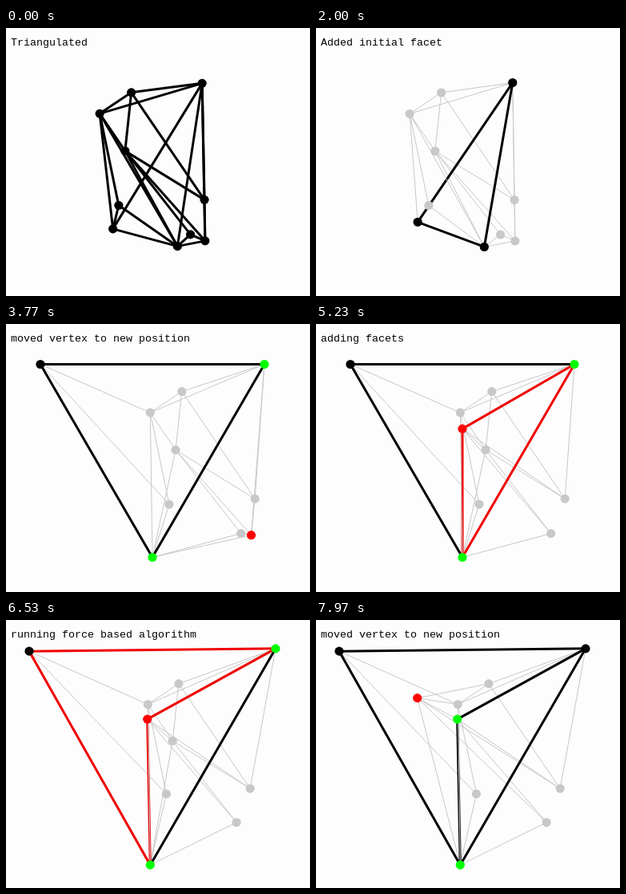
These frames come from a looping animation (380 by 336 pixels, 8 s). An HTML page with a canvas:

```html
<!DOCTYPE html>
<html lang="en">
<head>
<meta charset="utf-8">
<title>Planar drawing, step by step</title>
<style>
html, body { margin: 0; width: 100%; height: 100%; overflow: hidden; background: #fdfdfe; }
canvas { display: block; }
</style>
</head>
<body>
<canvas id="stage" width="380" height="336"></canvas>
<script>
const ctx = document.getElementById('stage').getContext('2d');
const LOOP = 8000;
const CENTER = [183, 171.5];

const START = {
  A: [117.3, 107.5], B: [156.8, 81], C: [245.3, 69.5], D: [149, 154.3], E: [141, 222.5],
  F: [133.8, 252], G: [214.5, 273.8], H: [230.7, 259], I: [249, 267], J: [248.2, 215.5]
};
const NAMES = Object.keys(START);
const EDGES = ('AB AC AF AE AD BC BD BJ EF EG CJ CI DJ DI DH DG ' +
  'GH IJ HI CF CG FG GI AG').split(' ').filter(e => e !== 'HI');

const BLACK = [0, 0, 0], RED = [255, 0, 0], LINE_RED = [240, 0, 0], GREEN = [0, 255, 0];
const FAINT = [200, 200, 200];
const STRONG_WIDTH = 3, FAINT_WIDTH = 1;

// Each stage fades to its own look: strong edges and coloured nodes.
const STAGES = [
  { at: 0, fade: 1, text: 'Triangulated', black: EDGES.join(' ') + ' ' + NAMES.join(' ') },
  { at: 40, fade: 850, text: 'Added initial facet', black: 'CF CG FG C F G' },
  { at: 2530, fade: 800, text: 'moved vertex to new position',
    black: 'CF CG FG F', red: 'I', green: 'C G' },
  { at: 4290, fade: 700, text: 'adding facets',
    black: 'CF FG F', red: 'CI GI CG I', green: 'C G' },
  { at: 5260, fade: 500, text: 'running force based algorithm',
    black: 'CG F', red: 'CF FG CI GI I', green: 'C G' },
  { at: 6560, fade: 650, text: 'moved vertex to new position',
    black: 'CF FG CG CI GI C F', red: 'D', green: 'G I' }
];

const squeeze = ([x, y]) => [x * 0.977 + 62.7, y * 0.977 + 0.9];
const MOVES = [
  { from: 1795, to: 2470, goal: { F: [-20, 46.9], C: [260, 46.9], G: [120, 288.9] } },
  { from: 3565, to: 4240, goal: { I: [120, 127.8] } },
  { from: 5420, to: 6130, rest: squeeze,
    goal: { F: [29, 39.3], C: [337, 36], G: [180.3, 307.3], I: [176.7, 124.5] } },
  { from: 7220, to: 7960, goal: { D: [126.7, 98] } }
];

const clamp = v => Math.min(1, Math.max(0, v));
const mix = (a, b, k) => a.map((v, i) => v + (b[i] - v) * k);
const ease = u => u < 0.5 ? 16 * u ** 5 : 1 - 16 * (1 - u) ** 5;
const rgb = c => `rgb(${c.map(Math.round)})`;
const has = (list, key) => (list || '').split(' ').some(k => k === key || k === key[1] + key[0]);

// A look is [r, g, b, line width].
function look(stage, key) {
  const edge = key.length === 2;
  if (has(stage.red, key)) return [...(edge ? LINE_RED : RED), STRONG_WIDTH];
  if (has(stage.green, key)) return [...GREEN, STRONG_WIDTH];
  if (has(stage.black, key)) return [...BLACK, STRONG_WIDTH];
  return [...FAINT, FAINT_WIDTH];
}
EDGES.unshift('HI');
STAGES[0].black += ' HI';
for (const stage of STAGES) {
  stage.looks = {};
  for (const key of [...EDGES, ...NAMES]) stage.looks[key] = look(stage, key);
}

function positions(t) {
  let pos = { ...START };
  for (const { from, to, goal, rest } of MOVES) {
    const k = ease(clamp((t - from) / (to - from)));
    if (k === 0) break;
    for (const n of NAMES) {
      const end = goal[n] || (rest ? rest(pos[n]) : pos[n]);
      pos[n] = mix(pos[n], end, k);
    }
  }
  // Keep the bounding box of the graph centred.
  const shift = [0, 1].map(i => {
    const v = NAMES.map(n => pos[n][i]);
    return CENTER[i] - (Math.min(...v) + Math.max(...v)) / 2;
  });
  for (const n of NAMES) pos[n] = pos[n].map((v, i) => v + shift[i]);
  return pos;
}

function draw(t) {
  const index = STAGES.findLastIndex(s => s.at <= t);
  const stage = STAGES[index], before = STAGES[Math.max(0, index - 1)];
  const k = clamp((t - stage.at) / stage.fade);
  const pos = positions(t);
  const current = key => mix(before.looks[key], stage.looks[key], k);

  ctx.fillStyle = '#fdfdfe';
  ctx.fillRect(0, 0, 380, 336);

  for (const e of EDGES) {
    const [r, g, b, width] = current(e);
    ctx.strokeStyle = rgb([r, g, b]);
    ctx.lineWidth = width;
    ctx.beginPath();
    ctx.moveTo(...pos[e[0]]);
    ctx.lineTo(...pos[e[1]]);
    ctx.stroke();
  }
  for (const n of NAMES) {
    ctx.fillStyle = rgb(current(n).slice(0, 3));
    ctx.beginPath();
    ctx.arc(...pos[n], 5.6, 0, Math.PI * 2);
    ctx.fill();
  }

  ctx.fillStyle = '#000';
  ctx.font = '13.33px "Liberation Mono", monospace';
  ctx.fillText(stage.text, 6, 22);
}

const begin = performance.now();
function frame() {
  draw((performance.now() - begin) % LOOP);
  requestAnimationFrame(frame);
}
draw(0);
requestAnimationFrame(frame);
</script>
</body>
</html>
```
